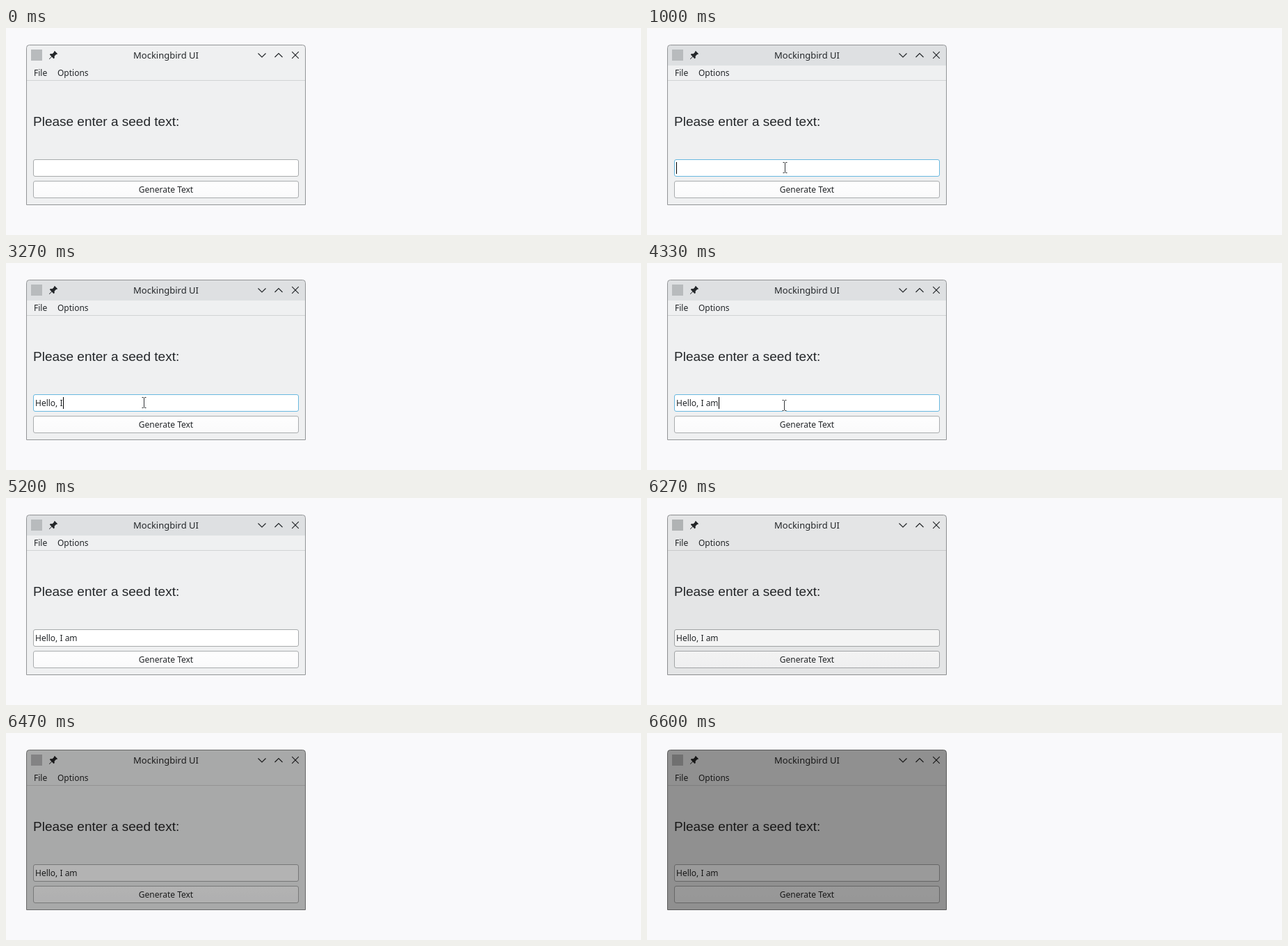
Recreate the animation shown at these times as an HTML page. Size 913x298 px, loop 8000 ms.

```html
<!DOCTYPE html>
<html lang="en">
<head>
<meta charset="utf-8">
<title>Seed text window</title>
<style>
html, body { margin: 0; width: 100%; height: 100%; overflow: hidden; background: #f9f9fb; }
svg { display: block; width: 913px; height: 298px; }
text { font: 12px "Noto Sans", sans-serif; fill: #232629; white-space: pre; }
.title { font-size: 13px; }
.label { font: 19px "Liberation Sans", Arial, sans-serif; }
.mid { text-anchor: middle; }
.glyph { fill: none; stroke: #232629; stroke-width: 1.15; }
.pointer { fill: #232629; stroke: #fff; stroke-width: 1; stroke-linejoin: round; }
</style>
</head>
<body>
<svg viewBox="0 0 913 298">
  <defs>
    <linearGradient id="face" x1="0" y1="0" x2="0" y2="1">
      <stop offset="0" stop-color="#fefefe"/>
      <stop offset="1" stop-color="#fafafb"/>
    </linearGradient>
  </defs>

  <g id="window">
    <path d="M29.5 254.5V28.5q0-4 4-4H426.5q4 0 4 4V254.5Z" fill="#eff0f1"/>
    <path id="bar" d="M30 54V28.5q0-3.5 3.5-3.5H426.5q3.5 0 3.5 3.5V54Z"/>
    <path d="M29.5 254.5V28.5q0-4 4-4H426.5q4 0 4 4V254.5Z" fill="none" stroke="#929496"/>
    <path d="M30 75.5H430" stroke="#d1d3d4"/>

    <rect x="36" y="31" width="16" height="16" fill="#b8bbbd"/>
    <path fill="#232629" d="M70 33l4.200 4.200-1.300 .9-.8-.2-2.500 2.500 .2 2.600-1.200 1.200-2.700-2.700-3.200 3.300-.7.1.1-.7 3.300-3.200-2.600-2.700 1.200-1.200 2.600.2 2.500-2.500-.2-.9z"/>
    <g class="glyph">
      <path d="M362.500 36.500L368 42L373.500 36.500"/>
      <path d="M386.500 42L392 36.500L397.500 42"/>
      <path d="M411.200 34.200L420.800 43.800M420.800 34.200L411.200 43.800"/>
    </g>
    <text class="title mid" x="230" y="44">Mockingbird UI</text>
    <text x="40" y="69">File</text>
    <text x="74" y="69">Options</text>
    <text class="label" x="39" y="141">Please enter a seed text:</text>

    <rect id="field" x="39.500" y="189.500" width="381" height="24" rx="2.500" fill="#fff"/>
    <text id="entry" x="42" y="206"></text>
    <rect id="caret" y="193" width="1" height="17" fill="#000"/>

    <rect x="39.500" y="220.500" width="381" height="24" rx="2.500" fill="url(#face)" stroke="#a9acae"/>
    <text class="mid" x="230" y="237">Generate Text</text>
  </g>

  <path id="arrow" class="pointer" d="M.5 .5V17.500L4.700 13.700L7.600 20L10.300 18.800L7.500 12.700H12.800Z"/>
  <g id="beam" fill="none">
    <path d="M-2.500 -8H2.500M0 -8V8M-2.500 8H2.500" stroke="#fff" stroke-width="2.400" opacity=".7"/>
    <path d="M-3 -7.500H-1L0 -6.500L1 -7.500H3M0 -7V7M-3 7.500H-1L0 6.500L1 7.500H3" stroke="#333639"/>
  </g>
</svg>

<script>
const LOOP = 8000;
const $ = id => document.getElementById(id);
const [win, bar, field, entry, caret, arrow, beam] =
  ["window", "bar", "field", "entry", "caret", "arrow", "beam"].map($);

const IDLE = "#a7aaac", FOCUS = "#69b8df";
const typed = text => ({ text, caret: true });
const point = (x, y) => ({ arrow: [x, y], beam: null });
const hover = (x, y) => ({ arrow: null, beam: [x, y] });
const dim = light => ({ light });

// Each step changes only the listed parts of the state.
const steps = [
  [0, { active: false, edge: IDLE, text: "", caret: false, arrow: null, beam: null, light: 1 }],
  [670, point(94, 278)],
  [730, point(160, 229)],
  [800, hover(198.5, 201)],
  [1000, { active: true, edge: FOCUS, caret: true }],
  [1470, { caret: false }],
  [1600, typed("H")],
  [1730, typed("He")],
  [1800, typed("Hel")],
  [1930, typed("Hell")],
  [2070, typed("Hello")],
  [2670, { caret: false }],
  [2930, typed("Hello,")],
  [3000, typed("Hello, ")],
  [3270, typed("Hello, I")],
  [3400, typed("Hello, I ")],
  [3730, typed("Hello, I a")],
  [3800, typed("Hello, I am")],
  [4330, hover(197.5, 205)],
  [4400, { ...point(194, 216), caret: false }],
  [4470, point(189, 229)],
  [4530, point(185, 238)],
  [4600, point(183, 242)],
  [4870, { edge: "#8bb2c6" }],
  [4930, { edge: IDLE }],
  [5130, point(184, 248)],
  [5200, { arrow: null }],
  [5530, { active: false }],
  [6270, dim(.955)],
  [6330, dim(.882)],
  [6400, dim(.79)],
  [6470, dim(.703)],
  [6530, dim(.645)],
  [6600, dim(.602)]
];

const stateAt = time =>
  Object.assign({}, ...steps.filter(([start]) => start <= time).map(step => step[1]));

function place(node, pos) {
  node.style.display = pos ? "" : "none";
  if (pos) node.setAttribute("transform", `translate(${pos})`);
}

function render(time) {
  const s = stateAt(time);
  bar.setAttribute("fill", s.active ? "#dee0e2" : "#eff0f1");
  field.setAttribute("stroke", s.edge);
  if (entry.textContent !== s.text) entry.textContent = s.text;
  caret.style.display = s.caret ? "" : "none";
  if (s.caret) {
    const width = s.text ? entry.getComputedTextLength() : 0;
    caret.setAttribute("x", Math.round(42 + width));
  }
  place(arrow, s.arrow);
  place(beam, s.beam);
  // Fading out also drains the colour.
  win.style.filter = s.light < 1
    ? `brightness(${s.light}) saturate(${Math.max(0, 2.5 * s.light - 1.5)})`
    : "none";
}

const start = performance.now();
function frame() {
  render((performance.now() - start) % LOOP);
  requestAnimationFrame(frame);
}
frame();
</script>
</body>
</html>
```
